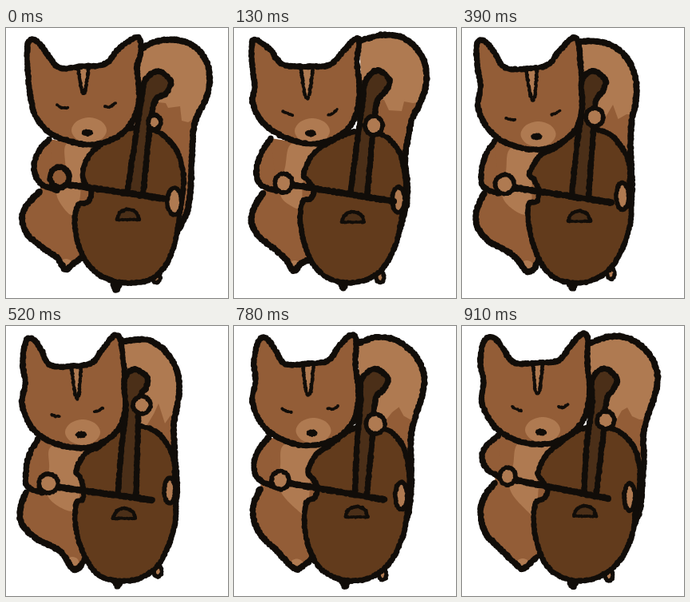
These frames come from a looping animation (278 px wide and 338 px high, 1040 ms). An HTML page with a canvas:

```html
<!DOCTYPE html>
<html lang="en">
<head>
<meta charset="utf-8">
<title>Squirrel playing the cello</title>
<style>
html, body { margin: 0; width: 100%; height: 100%; overflow: hidden; background: #fff; }
canvas { display: block; }
</style>
</head>
<body>
<canvas id="stage" width="278" height="338"></canvas>
<script>
const ctx = document.getElementById('stage').getContext('2d');
const STEP = 130;
const INK = '#110d09', FUR = '#935d37', LIGHT = '#af7a51', WOOD = '#623b1c', DARK = '#4b2f18';

// Each pose: outlines as x, y pairs; small parts as centre and radii.
const poses = [{
  head: [33,14, 27,22, 27,50, 31,88, 38,112, 56,132, 84,143, 110,146, 136,138, 153,124, 163,106, 167,82, 164,50, 169,30, 167,13, 158,14, 140,27, 124,45, 96,48, 68,50, 54,36, 42,20],
  tail: [166,28, 188,17, 213,15, 236,23, 251,42, 255,64, 251,87, 241,107, 235,127, 233,160, 231,200, 226,232, 210,262],
  fade: [160,90, 200,94, 203,100, 218,98, 220,116, 228,118, 250,104],
  arm: [54,139, 40,156, 35,177, 44,195, 64,203],
  side: [42,205, 26,222, 20,238, 27,259, 46,275, 64,288, 74,302, 82,297, 94,288],
  belly: [76,145, 112,148, 96,178, 92,216, 82,234, 66,216, 64,200, 74,178],
  cello: [118,146, 102,163, 96,184, 100,196, 107,206, 102,218, 90,222, 86,245, 91,272, 103,296, 122,312, 150,319, 180,315, 200,297, 212,267, 217,236, 222,200, 221,176, 211,149, 186,128, 150,127],
  neck: [152,205, 161,145, 170,87, 174,66, 190,54, 206,66, 200,82, 187,91, 180,126, 172,206],
  stripe: [90,50, 95,78, 99,79, 104,47],
  eyes: [64,96, 70,100, 77,100, 124,98, 130,99, 137,94],
  nose: [102,131], bow: [78,196, 200,214], paw: [67,187, 12, 13],
  hand: [186,118, 8, 9], grip: [211,217, 9, 17], hole: [153,240], peg: [138,326], foot: [188,312]
}, {
  head: [24,15, 22,28, 23,50, 26,74, 23,92, 34,116, 54,132, 78,142, 102,145, 128,137, 146,122, 155,100, 157,72, 154,42, 157,16, 150,15, 136,30, 120,46, 98,48, 62,46, 46,28, 32,17],
  tail: [158,16, 183,9, 208,11, 228,25, 240,48, 240,74, 232,96, 223,114, 218,138, 214,165, 217,195, 216,220, 208,250],
  fade: [150,90, 188,90, 194,103, 210,104, 213,92, 224,94, 250,90],
  arm: [46,138, 34,157, 28,178, 33,196, 54,204],
  side: [36,207, 25,225, 22,244, 31,261, 50,276, 65,290, 75,304, 84,295, 97,289],
  belly: [72,145, 106,148, 92,172, 86,198, 84,224, 72,223, 58,208, 64,174],
  cello: [114,146, 96,162, 87,184, 93,191, 100,203, 96,214, 86,217, 83,242, 89,272, 100,297, 118,313, 142,319, 168,314, 188,299, 203,270, 210,236, 215,200, 212,172, 204,150, 184,133, 150,130],
  neck: [146,205, 154,145, 161,93, 165,66, 180,53, 195,66, 188,81, 179,93, 174,130, 167,207],
  stripe: [84,52, 89,84, 94,84, 99,50],
  eyes: [61,104, 67,107, 73,109, 118,109, 123,107, 129,102],
  nose: [96,132], bow: [70,196, 200,217], paw: [62,194, 11, 12],
  hand: [175,122, 11, 12], grip: [206,215, 8, 16], hole: [149,243], peg: [137,324], foot: [183,312]
}, {
  head: [13,17, 13,28, 18,51, 22,76, 20,101, 32,124, 50,140, 76,150, 102,151, 126,142, 142,127, 150,108, 152,80, 150,45, 147,15, 138,15, 121,30, 107,46, 84,51, 53,51, 37,30, 22,16],
  tail: [104,40, 124,20, 152,14, 180,14, 204,28, 219,54, 221,84, 215,110, 211,140, 212,170, 212,200, 210,225, 205,248],
  fade: [140,122, 172,116, 180,104, 187,95, 192,106, 206,104, 240,102],
  arm: [42,141, 30,158, 24,177, 26,196, 48,206],
  side: [30,207, 20,225, 17,247, 28,267, 50,280, 67,293, 78,306, 88,301, 93,289],
  belly: [66,150, 102,153, 86,174, 83,202, 82,232, 68,233, 50,212, 56,180],
  cello: [118,149, 96,160, 81,184, 88,191, 95,204, 91,217, 79,219, 80,244, 86,270, 97,296, 114,312, 138,319, 164,314, 186,297, 202,268, 211,236, 210,200, 208,170, 196,148, 176,131, 144,131],
  neck: [135,207, 142,150, 151,96, 152,67, 166,53, 182,65, 177,81, 168,93, 163,134, 154,211],
  stripe: [79,55, 86,86, 91,86, 94,52],
  eyes: [53,114, 59,116, 66,117, 113,110, 118,108, 124,104],
  nose: [93,136], bow: [66,198, 190,219], paw: [54,194, 12, 12],
  hand: [162,124, 11, 12], grip: [197,215, 9, 18], hole: [146,243], peg: [137,325], foot: [183,308]
}, {
  head: [27,16, 23,26, 21,48, 24,72, 20,97, 31,125, 50,142, 76,151, 102,152, 124,144, 140,130, 148,112, 150,80, 147,46, 143,16, 134,13, 119,32, 108,46, 86,50, 56,49, 44,30, 35,17],
  tail: [146,20, 164,17, 182,19, 200,32, 213,53, 217,78, 214,102, 210,125, 211,150, 212,172, 214,195, 213,220, 207,248],
  fade: [140,125, 176,125, 185,110, 191,97, 199,122, 206,112, 240,118],
  arm: [40,142, 30,159, 25,181, 27,201, 46,209],
  side: [25,208, 18,228, 20,248, 38,266, 56,275, 70,284, 82,302, 90,304, 99,292],
  belly: [58,150, 106,153, 92,170, 92,200, 90,228, 74,230, 52,212, 54,178],
  cello: [118,150, 100,159, 88,180, 93,190, 97,204, 96,217, 88,222, 87,248, 93,275, 104,298, 118,313, 140,319, 167,316, 190,300, 206,268, 213,236, 210,202, 211,172, 202,148, 182,129, 148,126],
  neck: [140,210, 145,150, 150,102, 148,68, 161,54, 177,65, 175,78, 167,92, 165,140, 163,211],
  stripe: [82,53, 87,87, 91,87, 94,52],
  eyes: [57,111, 62,113, 67,113, 111,107, 115,106, 121,103],
  nose: [94,136], bow: [66,202, 184,218], paw: [53,197, 12, 12],
  hand: [170,99, 11, 11], grip: [205,206, 7, 16], hole: [148,241], peg: [140,324], foot: [190,307]
}, {
  head: [36,15, 32,24, 27,44, 27,68, 21,92, 31,122, 50,139, 77,150, 104,150, 128,141, 143,127, 150,110, 152,84, 147,50, 149,20, 142,13, 129,23, 115,43, 92,48, 63,49, 52,32, 43,18],
  tail: [150,22, 172,15, 196,20, 219,38, 231,62, 229,92, 222,113, 216,137, 215,164, 218,190, 217,215, 214,240, 206,262],
  fade: [140,125, 185,120, 196,110, 206,101, 212,112, 219,117, 250,115],
  arm: [40,142, 30,163, 25,185, 29,203, 50,211],
  side: [24,213, 21,234, 27,254, 42,269, 58,282, 70,297, 80,305, 88,303, 101,294],
  belly: [56,150, 106,153, 93,174, 94,204, 90,232, 82,234, 56,208, 52,176],
  cello: [120,150, 101,160, 90,180, 98,190, 102,203, 99,214, 90,219, 86,246, 91,274, 103,298, 120,312, 144,319, 172,315, 194,297, 210,264, 217,232, 217,202, 214,172, 206,146, 188,129, 150,128],
  neck: [150,207, 152,150, 154,96, 156,68, 174,54, 191,64, 186,78, 173,92, 170,142, 165,210],
  stripe: [84,52, 89,84, 95,84, 98,50],
  eyes: [58,106, 63,109, 69,109, 114,105, 120,106, 127,103],
  nose: [96,135], bow: [70,201, 195,219], paw: [59,198, 12, 12],
  hand: [174,127, 13, 14], grip: [209,211, 8, 17], hole: [153,240], peg: [139,324], foot: [188,310]
}, {
  head: [33,14, 26,23, 23,46, 27,70, 25,96, 37,121, 55,137, 82,147, 110,147, 132,138, 147,125, 156,107, 160,80, 157,46, 157,14, 149,11, 135,26, 121,43, 97,46, 66,46, 52,29, 42,16],
  tail: [159,22, 186,13, 212,17, 235,36, 245,62, 241,88, 233,112, 227,138, 228,165, 226,190, 225,212, 221,236, 208,262],
  fade: [150,120, 192,120, 200,106, 207,102, 213,113, 222,117, 250,116],
  arm: [46,137, 31,149, 25,164, 32,180, 50,190],
  side: [41,196, 28,214, 23,234, 30,260, 48,279, 64,295, 75,304, 83,299, 94,289],
  belly: [72,146, 114,150, 101,172, 96,202, 92,236, 78,228, 60,204, 64,174],
  cello: [122,147, 105,162, 95,184, 101,194, 107,206, 102,216, 92,222, 90,248, 95,276, 106,300, 124,314, 147,319, 174,313, 198,293, 213,262, 217,232, 222,200, 222,174, 213,148, 190,129, 152,128],
  neck: [153,207, 156,150, 163,97, 163,67, 178,53, 194,66, 189,80, 181,93, 177,135, 168,211],
  stripe: [89,50, 92,81, 97,81, 101,47],
  eyes: [63,101, 68,104, 74,106, 121,101, 127,102, 133,98],
  nose: [99,133], bow: [62,192, 183,216], paw: [57,188, 10, 11],
  hand: [180,118, 11, 11], grip: [210,214, 7, 17], hole: [154,238], peg: [139,325], foot: [184,312]
}];

function between(a, b) {
  const mid = {};
  for (const part in a) mid[part] = a[part].map((v, i) => (v + b[part][i]) / 2);
  return mid;
}
const [p0, p1, p2, p3, p4, p5] = poses;
const cycle = [p0, p1, p2, between(p2, p3), p3, p4, between(p4, p5), p5];

let seed = 1;
function rand() {
  seed = (seed * 16807) % 2147483647;
  return seed / 2147483647;
}

// Catmull-Rom curve through x, y pairs, sampled about once per pixel.
function curve(flat, closed) {
  const n = flat.length / 2, out = [];
  const at = i => {
    const k = closed ? (i + n) % n : Math.max(0, Math.min(n - 1, i));
    return [flat[2 * k], flat[2 * k + 1]];
  };
  for (let i = 0; i < (closed ? n : n - 1); i++) {
    const [a, b, c, d] = [at(i - 1), at(i), at(i + 1), at(i + 2)];
    const count = Math.max(2, Math.ceil(Math.hypot(c[0] - b[0], c[1] - b[1])));
    for (let j = 0; j < count; j++) {
      const t = j / count;
      out.push([0, 1].map(k => b[k] + t / 2 * (c[k] - a[k]
        + t * (2 * a[k] - 5 * b[k] + 4 * c[k] - d[k]
        + t * (3 * (b[k] - c[k]) + d[k] - a[k])))));
    }
  }
  if (!closed) out.push(at(n - 1));
  return out;
}

function trace(points) {
  ctx.beginPath();
  for (const [x, y] of points) ctx.lineTo(x, y);
  ctx.closePath();
}

function fill(points, color) {
  trace(points);
  ctx.fillStyle = color;
  ctx.fill();
}

// Crayon line: overlapping blots of uneven size.
function crayon(points, width) {
  ctx.fillStyle = INK;
  ctx.beginPath();
  for (const [x, y] of points) {
    const r = width * (0.4 + 0.16 * rand());
    const px = x + rand() - 0.5, py = y + rand() - 0.5;
    ctx.moveTo(px + r, py);
    ctx.arc(px, py, r, 0, 7);
  }
  ctx.fill();
}

function shape(flat, color, width) {
  const points = curve(flat, true);
  fill(points, color);
  if (width) crayon(points, width);
}

function line(flat, width) {
  crayon(curve(flat, false), width);
}

function oval([x, y, rx, ry], color, width) {
  shape([x - rx, y, x - rx * .7, y - ry * .7, x, y - ry, x + rx * .7, y - ry * .7,
    x + rx, y, x + rx * .7, y + ry * .7, x, y + ry, x - rx * .7, y + ry * .7], color, width);
}

const pairs = flat => flat.reduce((out, v, i) => (i % 2 ? out[out.length - 1].push(v) : out.push([v]), out), []);

function drawTail(p) {
  const edge = curve(p.tail, false);
  const area = [...edge, [185, 262], [160, 130]];
  fill(area, FUR);
  ctx.save();
  trace(area);
  ctx.clip();
  fill([...pairs(p.fade), [278, 0], [100, 0]], LIGHT);
  ctx.restore();
  crayon(edge, 7.5);
}

function drawBody(p) {
  const arm = curve(p.arm, false), side = curve(p.side, false);
  fill([arm[0], ...side, [112, 285], [125, 150]], FUR);
  fill(arm, FUR);
  shape(p.belly, LIGHT);
  oval([p.side[12] + 1, p.side[13] - 7, 8, 6], LIGHT);
  crayon(side, 7.5);
  crayon(arm, 7);
}

function drawCello(p) {
  const [fx, fy] = p.foot, [px, py] = p.peg, [hx, hy] = p.hole;
  oval([fx, fy, 5, 7], LIGHT, 5);
  line([px - 4, py - 5, px, py + 2, px + 4, py - 5], 7);
  shape(p.cello, WOOD, 6.5);
  oval(p.grip, LIGHT, 5.5);
  const arch = curve([hx - 14, hy, hx - 10, hy - 9, hx, hy - 13, hx + 10, hy - 9, hx + 14, hy], false);
  fill(arch, DARK);
  crayon(arch, 4.5);
  line([hx - 14, hy, hx + 14, hy], 4);
}

function drawHead(p) {
  const points = curve(p.head, true);
  fill(points, FUR);
  const [nx, ny] = p.nose;
  oval([nx + 2, ny - 3, 22, 16], LIGHT);
  fill(pairs(p.stripe), LIGHT);
  line(p.stripe, 4.5);
  crayon(points, 7);
  line(p.eyes.slice(0, 6), 3.8);
  line(p.eyes.slice(6), 3.8);
  oval([nx, ny, 5.5, 3], INK, 3);
}

function drawPlaying(p) {
  const neck = curve(p.neck, false);
  fill(neck, DARK);
  crayon(neck, 7);
  oval(p.hand, LIGHT, 5.5);
  line(p.bow, 8);
  oval(p.paw, p === p0 ? FUR : LIGHT, p === p0 ? 7 : 5.5);
}

function draw(index) {
  seed = 911 + index * 7919;
  ctx.fillStyle = '#fff';
  ctx.fillRect(0, 0, 278, 338);
  for (const part of [drawTail, drawBody, drawCello, drawHead, drawPlaying]) part(cycle[index]);
}

const start = performance.now();
let shown = -1;
function tick() {
  const index = Math.floor((performance.now() - start) / STEP) % cycle.length;
  if (index !== shown) draw(shown = index);
  requestAnimationFrame(tick);
}
tick();
</script>
</body>
</html>
```
